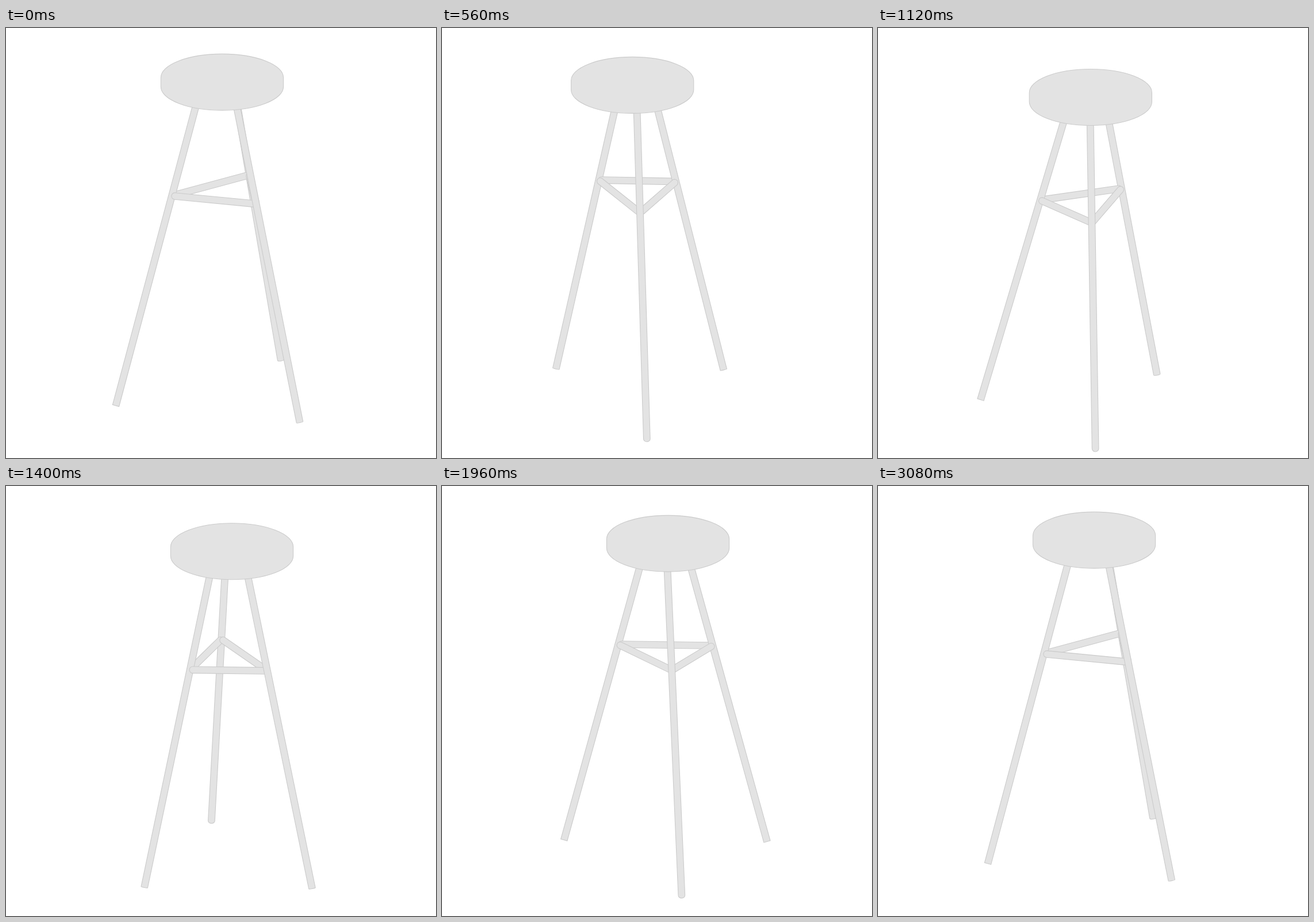
An HTML page with a canvas for the animation above (3150 ms loop, 748 px wide and 748 px high).

```html
<!DOCTYPE html>
<html lang="en">
<head>
<meta charset="utf-8">
<title>Rotating stool</title>
<style>
html, body { margin: 0; width: 100%; height: 100%; overflow: hidden; background: #fff; }
canvas { display: block; }
</style>
</head>
<body>
<canvas id="stage" width="748" height="748"></canvas>
<script>
const ctx = document.getElementById('stage').getContext('2d');
const STEP = 70, STEPS = 45;
const AXIS_X = 361.6, TILT = 0.385, ROD = 5.8, RING = 0.337;

// Floor-plan positions [x, z] around the turning axis; base is the foot's screen height.
const seat = [14.4, -33.1];
const legs = [
  { top: [-23.5, -19.7], foot: [-170.6, 22], base: 648.5 },
  { top: [35, -2.5], foot: [149.4, 106], base: 645 },
  { top: [33.5, -57], foot: [116.5, -184], base: 648 }
];

const mix = (a, b, t) => a + (b - a) * t;
const between = (p, q, t) => ({ x: mix(p.x, q.x, t), y: mix(p.y, q.y, t), z: mix(p.z, q.z, t) });

// CSS "ease" curve, solved by bisection.
function ease(x) {
  let lo = 0, hi = 1;
  for (let i = 0; i < 30; i++) {
    const s = (lo + hi) / 2;
    if (0.75 * s * (1 - s) + s ** 3 < x) lo = s; else hi = s;
  }
  return 0.3 * lo * (1 - lo) ** 2 + 3 * lo * lo * (1 - lo) + lo ** 3;
}

function project([x, z], base, angle) {
  const c = Math.cos(angle), s = Math.sin(angle);
  const depth = z * c + x * s;
  return { x: AXIS_X + x * c - z * s, y: base + TILT * depth, z: depth };
}

function paint() {
  ctx.fill();
  ctx.stroke();
}

// A rod from p to q whose ends bulge by capP and capQ.
function rod(p, q, capP, capQ) {
  ctx.save();
  ctx.translate(p.x, p.y);
  ctx.rotate(Math.atan2(q.y - p.y, q.x - p.x));
  const length = Math.hypot(q.x - p.x, q.y - p.y);
  ctx.beginPath();
  ctx.ellipse(0, 0, capP, ROD, 0, Math.PI / 2, Math.PI * 1.5);
  ctx.ellipse(length, 0, capQ, ROD, 0, -Math.PI / 2, Math.PI / 2);
  ctx.closePath();
  paint();
  ctx.restore();
}

function drawSeat(angle) {
  const { x, y } = project(seat, 106.9, angle);
  ctx.beginPath();
  ctx.ellipse(x, y - 8, 106.6, 41, 0, Math.PI, 0);
  ctx.ellipse(x, y + 8, 106.6, 41, 0, 0, Math.PI);
  ctx.closePath();
  paint();
}

function draw(angle) {
  ctx.fillStyle = '#fff';
  ctx.fillRect(0, 0, 748, 748);
  ctx.fillStyle = '#e3e3e3';
  ctx.strokeStyle = '#cbcbcb';
  ctx.lineWidth = 1.1;

  const parts = [];
  const joints = legs.map(leg => {
    const top = project(leg.top, 114, angle);
    const foot = project(leg.foot, leg.base, angle);
    const joint = between(top, foot, RING);
    const cap = ROD * Math.max(0, 1 - Math.abs(foot.x - top.x) / 130);
    parts.push({ z: joint.z, draw: () => rod(top, foot, 0, cap) });
    return joint;
  });
  joints.forEach((p, i) => {
    const q = joints[(i + 1) % 3];
    parts.push({
      z: (p.z + q.z) / 2,
      draw: () => rod(between(p, q, 0.035), between(p, q, 0.965), ROD, ROD)
    });
  });
  parts.sort((a, b) => a.z - b.z).forEach(part => part.draw());
  drawSeat(angle);
}

const start = performance.now();
function tick() {
  const step = Math.floor((performance.now() - start) / STEP) % STEPS;
  draw(-2 * Math.PI * ease(Math.max(0, (step - 0.5) / 44.5)));
  requestAnimationFrame(tick);
}
tick();
</script>
</body>
</html>
```
